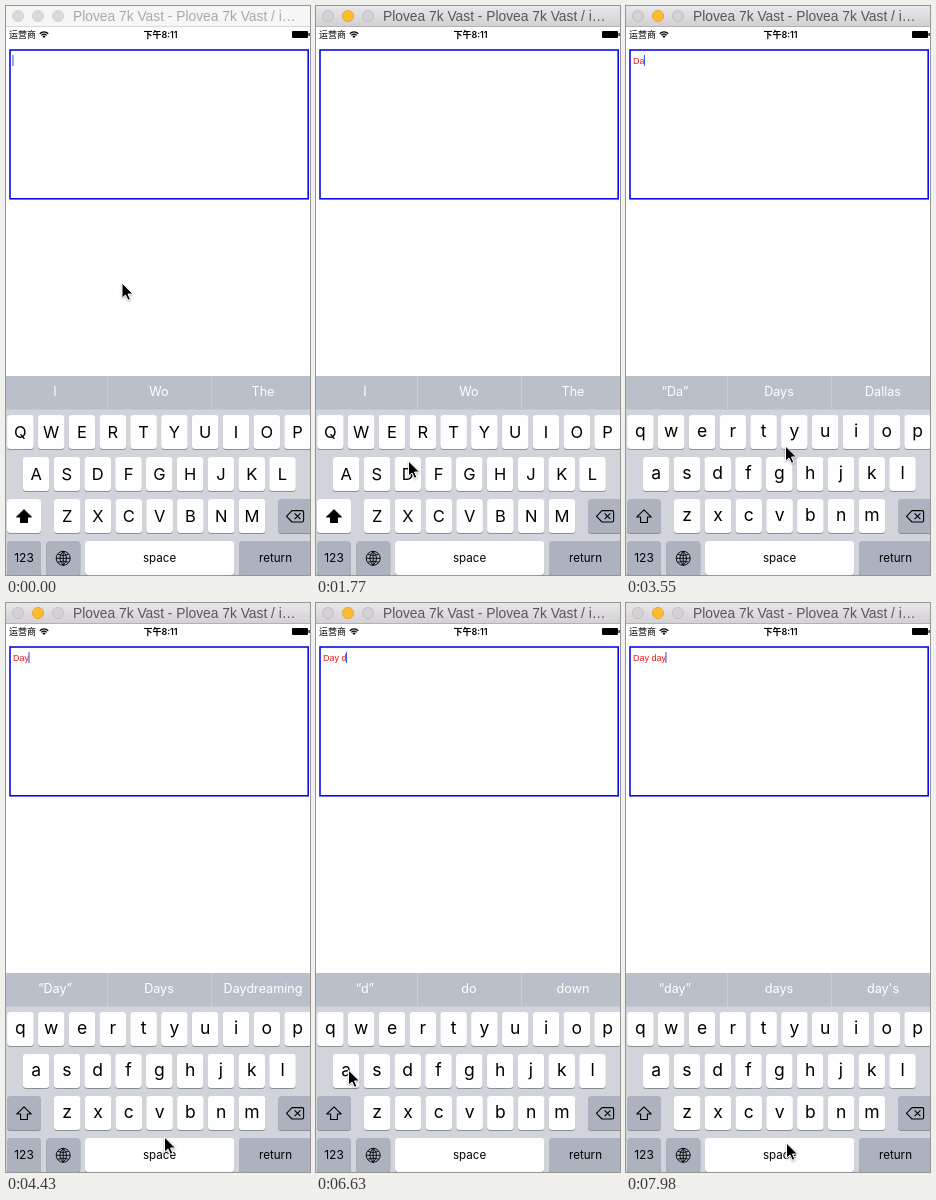
Write an HTML page that moves like this. It is 304 by 569 pixels and loops after 8000 ms.

```html
<!DOCTYPE html>
<html lang="en">
<head>
<meta charset="utf-8">
<title>Keyboard typing</title>
<style>
html, body { margin: 0; width: 100%; height: 100%; overflow: hidden; background: #fff; }
svg { display: block; width: 304px; height: 569px; }
text { font-family: Inter, Roboto, sans-serif; white-space: pre; }
.mid { text-anchor: middle; }
.title { font: 13.8px "Liberation Sans", Arial, sans-serif; }
.status { font: 500 9px Inter, "Noto Sans CJK SC", "Noto Sans CJK", sans-serif; }
.typed { font: 9px "Liberation Sans", Arial, sans-serif; fill: #f01818; }
.hint { font-size: 12.6px; fill: #fff; }
.label { font-size: 11.6px; }
</style>
</head>
<body>
<svg id="stage" viewBox="0 0 304 569" xmlns="http://www.w3.org/2000/svg">
  <defs>
    <linearGradient id="bar" x2="0" y2="1">
      <stop stop-color="#e9e7e9"/><stop offset="1" stop-color="#d2d0d2"/>
    </linearGradient>
  </defs>
</svg>
<script>
const LOOP = 8000, START = 292, STEP = 147.3;
const GREY = '#acb3be', WHITE = '#fefefe';
const stage = document.getElementById('stage');

function add(tag, attrs, content) {
  const el = document.createElementNS(stage.namespaceURI, tag);
  for (const name in attrs) el.setAttribute(name, attrs[name]);
  if (content) el.textContent = content;
  return stage.appendChild(el);
}
const rect = (x, y, width, height, fill, more) => add('rect', { x, y, width, height, fill, ...more });
const line = (d, more) => add('path', { d, fill: 'none', stroke: '#000', 'stroke-width': 1.1, ...more });
const label = (x, y, cls, content, more) => add('text', { x, y, class: cls, ...more }, content);

// Window bar
const bar = rect(0, 0, 304, 20.5, '#f6f6f6');
const barEdge = rect(0, 20, 304, 1, '#d8d8d8');
const lights = [12, 32, 52].map(cx => add('circle', { cx, cy: 10, r: 5.6, 'stroke-width': 0.8 }));
const title = label(67, 15, 'title', 'Plovea 7k Vast - Plovea 7k Vast / i…');

// Status bar
label(3, 32, 'status', '运营商');
for (const r of [5.6, 3.5]) {
  const k = r * 0.75;
  line(`M${38 - k} ${32 - k}A${r} ${r} 0 0 1 ${38 + k} ${32 - k}`, { 'stroke-width': 1.3 });
}
add('path', { d: 'M38 32L36.4 30.2A2.4 2.4 0 0 1 39.6 30.2Z' });
label(154.5, 32, 'status mid', '下午8:11', { style: 'font-weight:600' });
rect(286, 25, 16, 7, '#000', { rx: 1 });
rect(302.5, 27, 1.2, 3, '#000');

// Text box
rect(4, 44, 298.2, 148.8, 'none', { stroke: '#0b0bea', 'stroke-width': 1.6 });
const typed = label(7, 58, 'typed', '');
const caret = rect(7, 49, 1.1, 11, '#3f5cf0');

// Suggestions
rect(0, 370, 304, 199, '#d1d5db');
rect(0, 370, 304, 33.5, '#b9c0c9');
rect(101, 370, 1, 33.5, '#c9ced5');
rect(205, 370, 1, 33.5, '#c9ced5');
const hints = [49, 153, 257].map(x => label(x, 390, 'hint mid', ''));

// Keys
function key(x, y, w, fill) {
  rect(x, y + 1, w, 34, '#8b8f96', { rx: 3.5 });
  return rect(x, y, w, 34, fill, { rx: 3.5 });
}
const letters = [];
[['QWERTYUIOP', 14.4, 409], ['ASDFGHJKL', 30.1, 451], ['ZXCVBNM', 61.2, 493]].forEach(([row, x0, y]) => {
  [...row].forEach((char, i) => {
    const x = x0 + i * 30.8;
    key(x - 13.3, y, 26.6, WHITE);
    letters.push({ char, y, el: label(x, y + 23, 'mid', char) });
  });
});
const shift = key(1, 493, 34, WHITE);
const arrow = line('M18 503.8L25.2 511H21.4V516.5H14.6V511H10.8Z', { 'stroke-linejoin': 'round' });
key(272, 493, 40, GREY);
line('M280.5 510.3L286 504.6H296.2Q297.6 504.6 297.6 506V514.6Q297.6 516 296.2 516H286Z', { 'stroke-linejoin': 'round' });
line('M288.6 507.4L294.4 513.2M294.4 507.4L288.6 513.2');
key(1, 535, 34, GREY);
label(18, 556, 'label mid', '123', { style: 'font-size:12px' });
key(40.3, 535, 34, GREY);
line('M50.2 552.3A7 7 0 1 0 64.2 552.3A7 7 0 1 0 50.2 552.3ZM57.2 545.3V559.3M50.2 552.3H64.2' +
  'M57.2 545.3Q50.4 552.3 57.2 559.3Q64 552.3 57.2 545.3M51.8 548.4Q57.2 550.6 62.6 548.4M51.8 556.2Q57.2 554 62.6 556.2',
  { 'stroke-width': 0.9 });
const space = key(79, 535, 149.3, WHITE);
label(153.6, 555.5, 'label mid', 'space');
key(233, 535, 80, GREY);
label(269.5, 555.5, 'label mid', 'return');

const pointer = add('path', {
  d: 'M0 0V15.2L3.5 12L6 17.3L8.4 16.3L6 11H11Z', stroke: '#fff', 'stroke-width': 1,
  style: 'filter:drop-shadow(0 1px 1px rgba(0,0,0,.3))'
});

// Each table starts its rows with a step number
const typing = [[-1, ''], [14, 'D'], [20, 'Da'], [24, 'Day'], [34, 'Day '], [40, 'Day d'], [45, 'Day da'], [50, 'Day day']];
const guesses = [
  [-1, 'I', 'Wo', 'The'], [15, '“D”', 'Do', 'Did'], [21, '“Da”', 'Days', 'Dallas'],
  [26, '“Day”', 'Days', 'Daydreaming'], [34, 'off', 'of', 'and'], [41, '“d”', 'do', 'down'],
  [46, '“da”', 'day', 'days'], [51, '“day”', 'days', "day's"]
];
const blinks = [[2, 5], [9, 12], [18, 19], [30, 33], [38, 39]];
const path = [
  [-1, 116, 277], [2, 116, 277], [7, 112, 388], [10, 92.5, 455], [12, 89, 466], [15, 89, 466],
  [18, 32, 474], [20, 32, 474], [22, 159.5, 440], [25, 159.5, 440], [28, 158.5, 534], [34, 158.5, 534],
  [36, 70.5, 477], [38, 88, 470], [41, 88, 470], [43, 32.5, 467], [46, 31, 470],
  [48, 163, 437], [50, 163, 437], [52, 160.5, 540]
];

const rowAt = (table, n) => table.filter(row => row[0] <= n).pop();

function pointAt(n) {
  const from = rowAt(path, n);
  const to = path[path.indexOf(from) + 1] || from;
  let k = to === from ? 0 : (n - from[0]) / (to[0] - from[0]);
  k = k * k * (3 - 2 * k);
  return [1, 2].map(i => from[i] + (to[i] - from[i]) * k);
}

const ruler = document.createElement('canvas').getContext('2d');
ruler.font = '9px "Liberation Sans", Arial, sans-serif';

function draw(n) {
  const active = n >= 0, upper = n < 14;
  bar.setAttribute('fill', active ? 'url(#bar)' : '#f6f6f6');
  barEdge.setAttribute('fill', active ? '#b3b1b3' : '#d8d8d8');
  title.setAttribute('fill', active ? '#59575a' : '#a9a9a9');
  lights.forEach((light, i) => {
    const lit = active && i === 1;
    light.setAttribute('fill', lit ? '#fdbc2f' : active ? '#d3d1d3' : '#dadada');
    light.setAttribute('stroke', lit ? '#e0a02a' : active ? '#bebcbe' : '#cecece');
  });

  const words = rowAt(typing, n)[1];
  typed.textContent = words;
  caret.setAttribute('x', 6.4 + ruler.measureText(words).width);
  caret.setAttribute('opacity', blinks.some(([a, b]) => n >= a && n < b) ? 0 : 1);

  const guess = rowAt(guesses, n);
  hints.forEach((hint, i) => { hint.textContent = guess[i + 1]; });

  for (const { char, y, el } of letters) {
    el.textContent = upper ? char : char.toLowerCase();
    el.setAttribute('font-size', upper ? 16.5 : 17.5);
    el.setAttribute('y', y + (upper ? 23 : 22));
  }
  shift.setAttribute('fill', upper ? WHITE : GREY);
  arrow.setAttribute('fill', upper ? '#000' : 'none');
  space.setAttribute('fill', n === 33 ? GREY : WHITE);
  pointer.setAttribute('transform', `translate(${pointAt(n)})`);
}

const begin = performance.now();
function tick() {
  const time = (performance.now() - begin) % LOOP;
  draw(Math.max(-1, Math.floor((time - START) / STEP)));
  requestAnimationFrame(tick);
}
tick();
</script>
</body>
</html>
```
